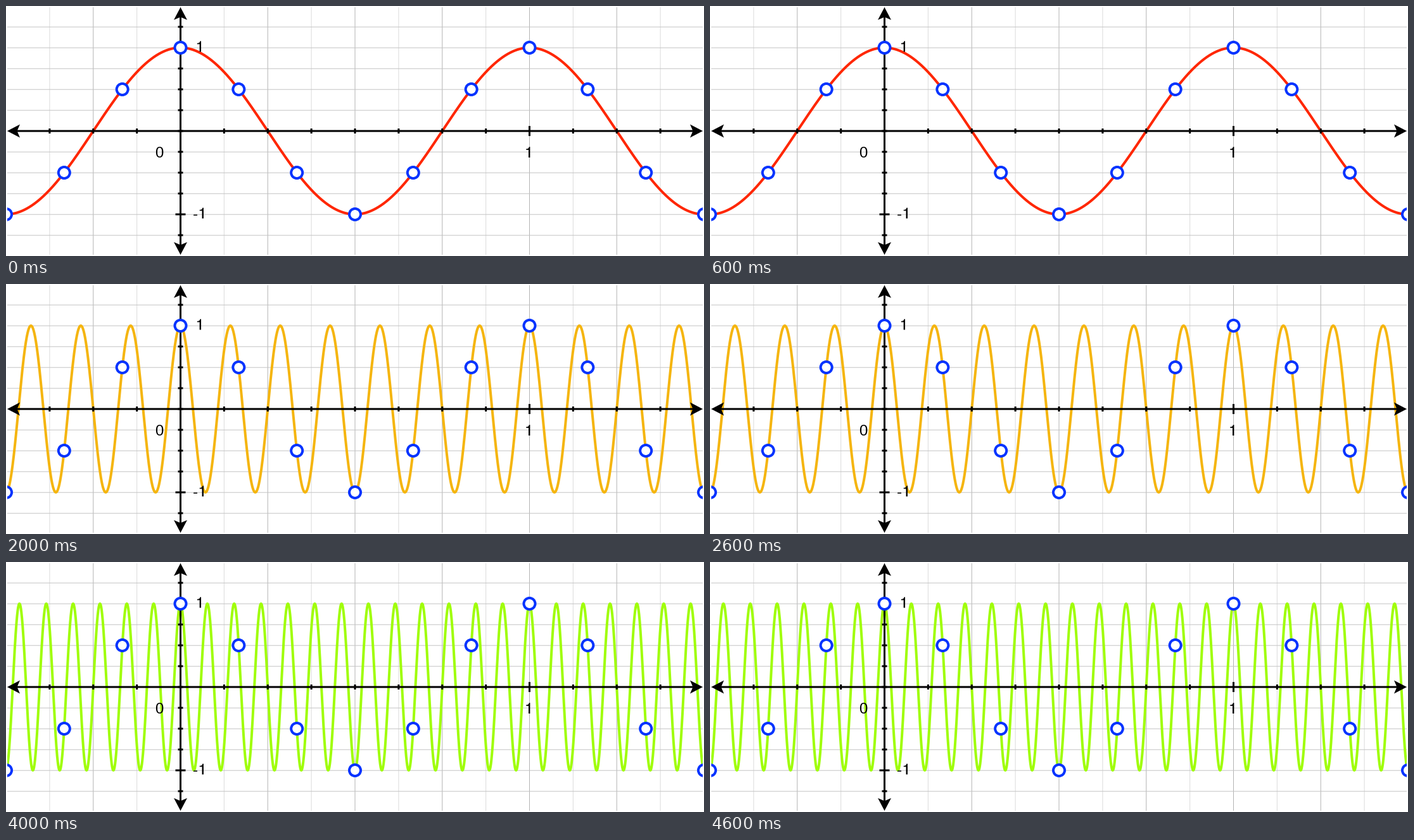
Write a matplotlib script that moves like this. It is 1102x396 px and loops after 5000 ms.

```python
import numpy as np
import matplotlib.pyplot as plt
from matplotlib.animation import FuncAnimation
from matplotlib.patches import Circle, PathPatch, Polygon, Rectangle
from matplotlib.path import Path

W, H, DPI = 1102, 396, 64
PT = 72 / DPI                # points per pixel
X0, Y0 = 275.5, 198          # origin of the plot
UNIT, AMP = 551, 132         # pixels per unit on each axis
LEFT, RIGHT, TOP, BOTTOM = 2, 1100, 2, 394
SIZE = 24                    # label size in pixels
BLUE = "#0433ff"

WAVES = [(1, "#ff2600"), (5, "#f97410"), (7, "#f5b50f"),
         (11, "#fdea0a"), (13, "#a0fd0a")]

fig = plt.figure(figsize=(W / DPI, H / DPI), dpi=DPI, facecolor="white")
ax = fig.add_axes([0, 0, 1, 1])
ax.set_xlim(0, W)
ax.set_ylim(H, 0)
ax.axis("off")
frame = Rectangle((LEFT, TOP), RIGHT - LEFT, BOTTOM - TOP,
                  transform=ax.transData)


def stroke(xs, ys, color, width, z):
    line, = ax.plot(xs, ys, color=color, lw=width * PT, zorder=z,
                    solid_capstyle="butt", solid_joinstyle="round",
                    snap=False)
    line.set_clip_path(frame)
    return line


def arrow(x, y, dx, dy):
    """Barbed head with its tip at (x, y), pointing along (dx, dy)."""
    shape = [(0, 0), (-20, 10.5), (-15.5, 0), (-20, -10.5)]
    pts = [(x + a * dx - b * dy, y + a * dy + b * dx) for a, b in shape]
    ax.add_patch(Polygon(pts, fc="black", lw=0, zorder=4, snap=False))


def one(x, base):
    """Plain numeral one without a foot."""
    pts = np.array([(.259, 0), (.259, .505), (.101, .505), (.101, .568),
                    (.225, .572), (.272, .600), (.289, .703),
                    (.359, .703), (.359, 0), (.259, 0)])
    codes = [Path.MOVETO] + [Path.LINETO] * 3 + [Path.CURVE4] * 3
    codes += [Path.LINETO] * 2 + [Path.CLOSEPOLY]
    pts = pts * (SIZE, -SIZE) + (x, base)
    ax.add_patch(PathPatch(Path(pts, codes), fc="black", lw=0, zorder=5,
                           snap=False))


def text(x, base, s):
    ax.text(x, base, s, size=SIZE * PT, family="Liberation Sans",
            va="baseline", ha="left", zorder=5)


def draw_grid():
    for k in range(-3, 12):
        x = X0 + k * UNIT / 8
        stroke([x, x], [TOP, BOTTOM], "#dcdcdc" if k % 2 else "#b4b4b4", 1, 1)
    for k in range(-5, 6):
        y = Y0 + k * AMP / 4 + .2
        stroke([LEFT, RIGHT], [y, y], "#c4c4c4", 1, 1)


def draw_axes():
    stroke([LEFT + 14, RIGHT - 14], [Y0, Y0], "black", 3, 4)
    stroke([X0, X0], [TOP + 14, BOTTOM - 14], "black", 3, 4)
    for k in range(-3, 12):
        x, r = X0 + k * UNIT / 8, 8 if k == 8 else 4
        stroke([x, x], [Y0 - r, Y0 + r], "black", 3, 4)
    for k in range(-5, 6):
        y, r = Y0 + k * AMP / 4, 8 if abs(k) == 4 else 4
        stroke([X0 - r, X0 + r], [y, y], "black", 3, 4)
    arrow(LEFT, Y0, -1, 0)
    arrow(RIGHT, Y0, 1, 0)
    arrow(X0, TOP, 0, -1)
    arrow(X0, BOTTOM, 0, 1)


def draw_labels():
    text(234.8, 240, "0")
    one(299.4, 72.5)
    one(818.8, 240)
    text(295.3, 336.5, "-")
    one(303.3, 336.5)


def draw_samples():
    for k in range(-3, 10):
        x = X0 + k * UNIT / 6
        y = Y0 - AMP * np.cos(k * np.pi / 3)
        dot = Circle((x, y), 9, fc="white", ec=BLUE, lw=4 * PT, zorder=6,
                     snap=False)
        ax.add_patch(dot)
        dot.set_clip_path(frame)


draw_grid()
draw_axes()
draw_labels()
draw_samples()

xs = np.linspace(0, W, 4409)
curve = stroke(xs, xs, WAVES[0][1], 4, 3)


def update(i):
    freq, color = WAVES[i % len(WAVES)]
    curve.set_ydata(Y0 - AMP * np.cos(2 * np.pi * freq * (xs - X0) / UNIT))
    curve.set_color(color)
    return curve,


anim = FuncAnimation(fig, update, frames=len(WAVES), interval=1000,
                     init_func=lambda: update(0), repeat=True,
                     repeat_delay=0, blit=False)
plt.show()
```
